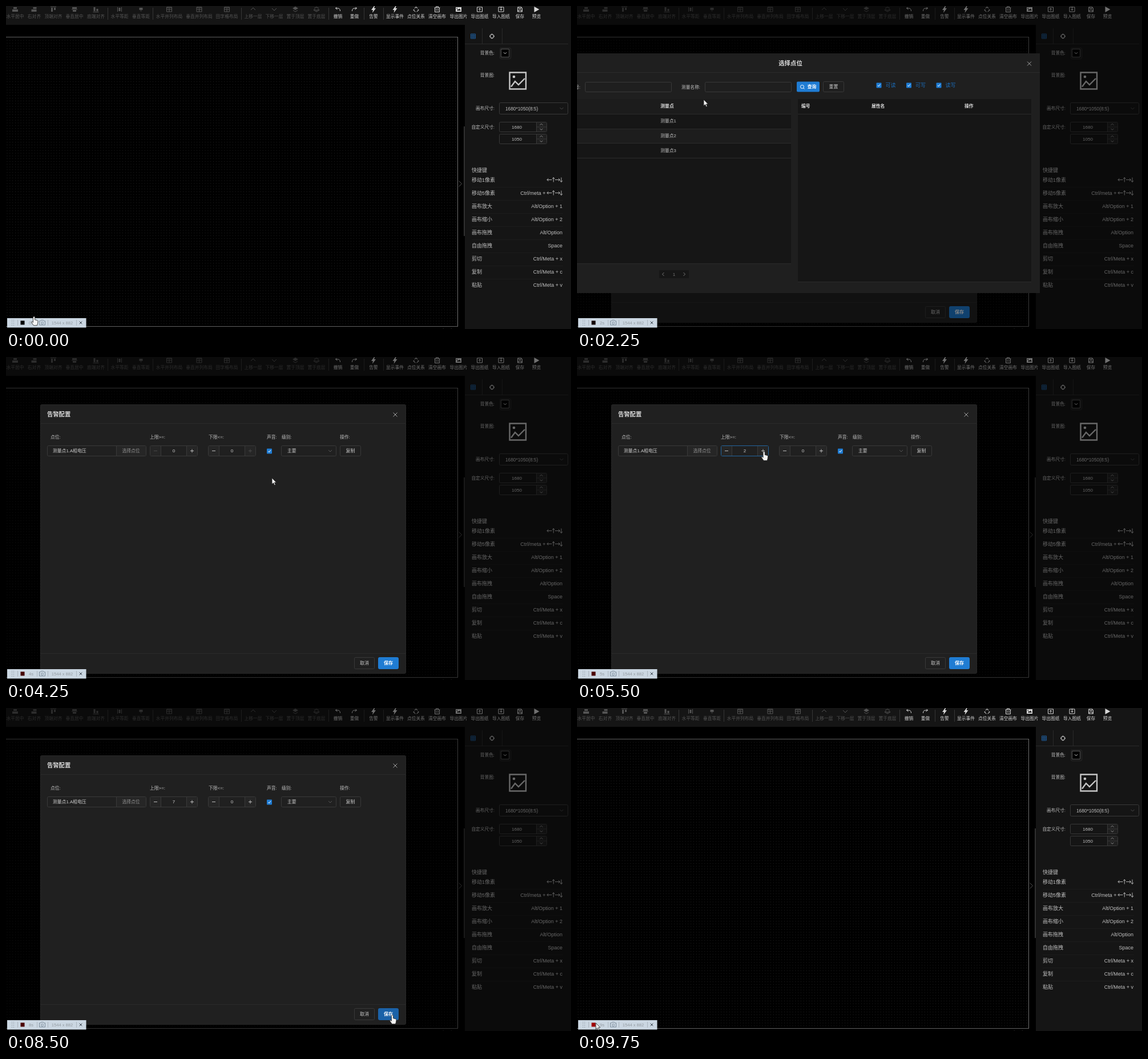
Recreate the animation shown at these times as an HTML page with a canvas. Size 990 by 566 pixels, loop 10 s.

```html
<!DOCTYPE html>
<html lang="zh-CN">
<head>
<meta charset="utf-8">
<title>告警配置</title>
<style>
  html, body { margin: 0; width: 100%; height: 100%; overflow: hidden; background: #000; }
  canvas { display: block; width: 100vw; height: 100vh; }
</style>
</head>
<body>
<canvas width="990" height="566"></canvas>
<script>
const c = document.querySelector('canvas').getContext('2d');
const LOOP = 10000, STEP = 250;
const FONT = '"Liberation Sans", "Noto Sans CJK SC", "Noto Sans CJK", sans-serif';
const BLUE = '#1f7cd3', LINK = '#1b6cb8', EDGE = '#393939', SOFT = '#c0c0c0', SHADE = 'rgba(0,0,0,.48)';

function text(s, x, y, size = 8, color = SOFT, align = 'left', weight = 500) {
  c.font = `${weight} ${size}px ${FONT}`;
  c.textAlign = align;
  c.fillStyle = color;
  c.fillText(s, x, y + size * 0.37);
}
function fill(x, y, w, h, color) {
  c.fillStyle = color;
  c.fillRect(x, y, w, h);
}
function box(x, y, w, h, stroke, color, radius = 2) {
  const inset = stroke ? 0.5 : 0;
  c.beginPath();
  c.roundRect(x + inset, y + inset, w - 2 * inset, h - 2 * inset, radius);
  if (color) { c.fillStyle = color; c.fill(); }
  if (stroke) { c.strokeStyle = stroke; c.lineWidth = 1; c.stroke(); }
}
function shape(d, x, y, { color, stroke, width = 1 }) {
  const path = new Path2D(d);
  c.save();
  c.translate(x, y);
  if (color) { c.fillStyle = color; c.fill(path); }
  if (stroke) { c.strokeStyle = stroke; c.lineWidth = width; c.stroke(path); }
  c.restore();
}
const cross = (x, y, r, color) => shape(`M${-r} ${-r}L${r} ${r}M${r} ${-r}L${-r} ${r}`, x, y, { stroke: color });
const chevron = (x, y, r, color, up = 1) => shape(`M${-r} ${-r * up / 2}L0 ${r * up / 2}L${r} ${-r * up / 2}`, x, y, { stroke: color });

// Icons are drawn around their own centre; solid ones are filled.
const ICONS = {
  center: { d: 'M-3-4h6v3h-6zM-5 0h10v4h-10z', solid: true },
  right: { d: 'M-2-4h6v3h-6zM-5 0h9v4h-9z', solid: true },
  top: { d: 'M-5-5h10v1h-10zM-4-3h3v7h-3zM1-3h3v4h-3z', solid: true },
  middle: { d: 'M-4-4h8v3h-8zM-5-.5h10v1h-10zM-3 1h6v3h-6z', solid: true },
  bottom: { d: 'M-4-4h3v7h-3zM1-1h3v4h-3zM-5 4h10v1h-10z', solid: true },
  spreadX: { d: 'M-4-4h1v8h-1zM3-4h1v8h-1zM-1.5-3h3v6h-3z', solid: true },
  spreadY: { d: 'M-3-3h6v4h-6zM-1 2h2v1h-2z', solid: true },
  table: { d: 'M-4.5-4h9v8h-9zM-4.5-3h9M-4.5 0h9M0-2v6' },
  up: { d: 'M-4 1L0-3L4 1' },
  down: { d: 'M-4-2L0 2L4-2' },
  front: { d: 'M0-5L5-2L0 1L-5-2zM-4 1L0 3.5L4 1V2L0 4.5L-4 2z', solid: true },
  back: { d: 'M-4-2L0-4L4-2M-5 1L0 4L5 1L3 0L0 2L-3 0z' },
  undo: { d: 'M-2-4L-4-2L-1 0M-4-2H0Q4-2 4 3' },
  redo: { d: 'M2-4L4-2L1 0M4-2H0Q-4-2-4 3' },
  bolt: { d: 'M1-6L-4 1H-1L-2 6L4-2H1L2-6z', solid: true },
  link: { d: 'M-3-2A4 4 0 0 1 3-2M4 0A4 4 0 0 1 1 4M-1 4A4 4 0 0 1-4 0M-5 1h2M3 1h2M-1-4h2' },
  trash: { d: 'M-5-3H5M-2-3V-5H2V-3M-4-3V4.5H4V-3M-1.5-1V2.5M1.5-1V2.5' },
  picture: { d: 'M-5-4H5V4H-5zM-3 2H4L1.5-1.5L0 .5L-1.5-.5zM-3.5-2.5v1.5h1.5v-1.5z', solid: true },
  output: { d: 'M-4.5-4H4.5V4H-4.5zM0 2.5V-2M-2 0L0-2L2 0' },
  input: { d: 'M-4.5-4H4.5V4H-4.5zM0-5V1.5M-2-.5L0 1.5L2-.5' },
  disk: { d: 'M-4-4H2.5L4-2.5V4H-4zM-2-4V-1.5H2V-4M-2.5 4V1H2.5V4' },
  play: { d: 'M-4-5L5 0L-4 5z', solid: true },
};
const ARROW_KEYS = 'M0 0H8.5M2.5-2.5L0 0L2.5 2.5M11.3 4V-4M9.3-1.5L11.3-4L13.3-1.5M14 0H22.5M20-2.5L22.5 0L20 2.5M25 -4V4M23 1.5L25 4L27 1.5';
const TOOLS = [
  [16, '水平居中', 'center'], [49.5, '右对齐', 'right'], [83, '顶端对齐', 'top'],
  [120, '垂直居中', 'middle'], [157.5, '底端对齐', 'bottom'],
  [199, '水平等距', 'spreadX'], [236.5, '垂直等距', 'spreadY'],
  [286, '水平并列布局', 'table'], [338.5, '垂直并列布局', 'table'], [387, '田字格布局', 'table'],
  [433, '上移一层', 'up'], [470, '下移一层', 'down'], [507, '置于顶层', 'front'], [544, '置于底层', 'back'],
  [581.5, '撤销', 'undo'], [610.5, '重做', 'redo'], [644, '告警', 'bolt'],
  [681.5, '显示事件', 'bolt'], [718.5, '点位关系', 'link'], [755.5, '清空画布', 'trash'],
  [793, '导出图片', 'picture'], [830, '导出图纸', 'output'], [867.5, '导入图纸', 'input'],
  [900.5, '保存', 'disk'], [929.5, '预览', 'play'],
];
const SHORTCUTS = [
  ['移动1像素', '', true], ['移动5像素', 'Ctrl/meta +', true], ['画布放大', 'Alt/Option + 1'],
  ['画布缩小', 'Alt/Option + 2'], ['画布拖拽', 'Alt/Option'], ['自由拖拽', 'Space'],
  ['剪切', 'Ctrl/Meta + x'], ['复制', 'Ctrl/Meta + c'], ['粘贴', 'Ctrl/Meta + v'],
];

function toolbar() {
  fill(0, 0, 990, 33, '#151515');
  for (const [x, label, name] of TOOLS) {
    const color = x < 560 ? '#545454' : '#d6d6d6', icon = ICONS[name];
    shape(icon.d, x, 6, icon.solid ? { color } : { stroke: color });
    text(label, x, 18.3, 7.75, color, 'center');
  }
  for (const x of [178, 257, 412, 565, 627, 661]) fill(x, 3, 1, 21, '#363636');
}

function drawingArea() {
  const pitch = 4.82;
  for (let y = 55 + pitch; y < 560; y += pitch)
    for (let x = 792 - 164 * pitch; x < 790; x += pitch) fill(x, y, 1, 1, '#262626');
  fill(0, 54, 792, 1, '#606060');
  fill(791, 54, 1, 508, '#707070');
  fill(0, 561, 792, 1, '#606060');
  text('1680 x 1050 (8:5)', 712, 568.5, 9, '#444');
}

function sidebar() {
  fill(804, 33, 186, 533, '#151515');
  fill(802, 211, 2, 192, '#303030');
  shape('M-2.5-5L2.5 0L-2.5 5', 796, 311.5, { stroke: '#555' });
  fill(804, 66, 181, 1, '#2a2a2a');
  fill(834, 39, 1, 27, '#2a2a2a');
  fill(869, 39, 1, 27, '#2a2a2a');
  shape('M-4-4H4V4H-4zM-4-1.3H4M-4 1.3H4M-1.3-4V4M1.3-4V4', 818.5, 53, { stroke: '#1f5a96' });
  shape('M3.5 0A3.5 3.5 0 1 1-3.5 0A3.5 3.5 0 1 1 3.5 0M0-4.5V-2M0 2V4.5M-4.5 0H-2M2 0H4.5', 851.5, 53, { stroke: '#ccc' });

  text('背景色:', 856, 82.5, 7.7, SOFT, 'right');
  box(865, 73, 20, 20, '#2b2b2b');
  box(867, 75, 15, 15, '#585858', '#000', 0);
  chevron(874.5, 82.5, 2.5, '#ddd');
  text('背景图:', 856, 121.5, 7.7, SOFT, 'right');
  shape('M1.5 1.5H30V30.5H1.5zM4 26.5L11 17L17 23L28 12', 881, 115, { stroke: '#c6c6c6', width: 2.4 });
  shape('M2.3 0A2.3 2.3 0 1 1-2.3 0A2.3 2.3 0 1 1 2.3 0', 890, 124, { color: '#c6c6c6' });

  text('画布尺寸:', 856, 179, 7.7, SOFT, 'right');
  box(864, 169, 121, 21, EDGE);
  text('1680*1050(8:5)', 875, 179.5, 8.3);
  chevron(973.5, 179.5, 3, '#4a4a4a');
  text('自定义尺寸:', 856, 212, 7.7, SOFT, 'right');
  [['1680', 203], ['1050', 224]].forEach(([value, y]) => {
    box(864, y, 84, 18, EDGE);
    fill(929, y + 1, 18, 16, '#202020');
    fill(929, y, 1, 18, EDGE);
    fill(929, y + 8.5, 18, 1, EDGE);
    chevron(938, y + 4.5, 2.5, '#8a8a8a', -1);
    chevron(938, y + 13, 2.5, '#8a8a8a');
    text(value, 895, y + 9, 8.1, SOFT, 'center');
  });

  text('快捷键', 816, 287.5, 9);
  SHORTCUTS.forEach(([label, keys, arrows], i) => {
    const y = 304.5 + i * 23.06;
    text(label, 816, y, 9);
    text(keys, arrows ? 945.5 : 975, y, 9, SOFT, 'right');
    if (arrows) shape(ARROW_KEYS, 948, Math.floor(y) + 0.5, { stroke: SOFT, width: 0.9 });
    if (i < 8) fill(816, Math.round(y + 12), 160, 1, '#1c1c1c');
  });
}

function checkbox(x, y) {
  box(x - 4.5, y - 4.5, 9, 9, null, BLUE, 1);
  shape('M-2 0L-.5 1.8L2.2-1.8', x, y, { stroke: '#fff' });
}
function button(label, x, y, w, h, color) {
  box(x, y, w, h, color || EDGE, color);
  text(label, x + w / 2, y + h / 2, 8, color ? '#fff' : '#c8c8c8', 'center', color ? 700 : 500);
}
function stepper(x, value, { focus, minus, plus }) {
  box(x, 155, 84, 19, focus ? '#23659f' : EDGE);
  fill(x + 1, 156, 18, 17, '#262626');
  fill(x + 65, 156, 18, 17, '#262626');
  fill(x + 19, 156, 1, 17, EDGE);
  fill(x + 64, 156, 1, 17, EDGE);
  shape('M-3 0H3', x + 10, 164.5, { stroke: minus ? '#bbb' : '#484848' });
  shape('M-3 0H3M0-3V3', x + 74, 164.5, { stroke: plus ? '#bbb' : '#484848' });
  text(value, x + 42, 164.5, 8, '#ccc', 'center');
}

function alarmDialog(t) {
  box(60, 83, 641, 472, '#272727', '#202020');
  text('告警配置', 72, 100.5, 10.3, '#ddd', 'left', 700);
  cross(682, 101, 3.5, '#a5a5a5');
  fill(60, 116, 640, 1, '#2b2b2b');
  fill(60, 519, 640, 1, '#2b2b2b');
  const heads = [[78, '点位:'], [252, '上限>=:'], [355, '下限<=:'], [457, '声音:'], [483, '级别:'], [585, '操作:']];
  for (const [x, label] of heads) text(label, x, 140, 7.8);

  box(72, 155, 174, 19, EDGE);
  fill(193, 156, 52, 17, '#262626');
  fill(193, 155, 1, 19, EDGE);
  if (t >= 3750) text('测量点1.A相电压', 82, 164.3, 7.8, '#ccc');
  text('选择点位', 219, 164.3, 7.8, '#929292', 'center');

  const clicks = t < 5000 ? 0 : Math.min(7, 1 + Math.floor((t - 5000) / 300));
  stepper(252, clicks, { focus: t >= 5000 && t < 7500, minus: clicks > 0, plus: true });
  stepper(354, 0, { minus: true, plus: clicks > 0 });
  checkbox(461.5, 165);
  box(482, 155, 97, 19, EDGE);
  text('主要', 493, 164.5, 7.8, '#ccc');
  chevron(568, 164.5, 3, '#555');
  button('复制', 585, 155, 37, 19);
  button('取消', 610, 526, 36, 21);
  button('保存', 652, 526, 36, 21, t >= 8250 ? '#1b62a8' : BLUE);
}

function pointDialog(t) {
  const loaded = t >= 2750;
  fill(0, 83, 811, 420, '#1f1f1f');
  text('选择点位', 374, 100.5, 10.4, '#ddd', 'center', 700);
  cross(792.5, 101, 3.5, '#a5a5a5');
  fill(0, 116, 811, 1, '#2b2b2b');
  text('编号:', 6, 142, 7.7, SOFT, 'right');
  box(14, 133, 152, 18, EDGE);
  text('测量名称:', 216, 142, 7.7, SOFT, 'right');
  box(224, 133, 152, 18, EDGE);
  box(385, 132.5, 40, 18, null, BLUE);
  shape('M3 0A3 3 0 1 1-3 0A3 3 0 1 1 3 0M2 2L4 4', 394.5, 141.5, { stroke: '#fff' });
  text('查询', 411.5, 141.5, 7.8, '#fff', 'center', 700);
  button('重置', 431, 132, 37, 19);
  [[529, '可读'], [581.5, '可写'], [634, '读写']].forEach(([x, label]) => {
    checkbox(x, 139);
    text(label, x + 20.5, 139, 9, LINK, 'center');
  });

  fill(0, 163, 375, 289, '#161616');
  fill(387, 163, 409, 321, '#161616');
  fill(0, 163, 375, 26, '#1c1c1c');
  if (loaded) fill(0, 189, 375, 25, '#111d30');
  fill(0, 215, 375, 25, '#1d1d1d');
  text('测量点', 158, 175.5, 7.8, '#ddd', 'center', 700);
  [[393, '编号'], [516, '属性名'], [679, '操作']].forEach(([x, label]) => text(label, x, 175.5, 7.8, '#ddd', 'left', 700));
  fill(0, 189, 375, 1, '#2b2b2b');
  fill(387, 189, 409, 1, '#2b2b2b');
  for (let i = 0; i < 3; i++) {
    const y = 201.5 + i * 25.8;
    text('测量点' + (i + 1), 160, y, 7.7, SOFT, 'center');
    fill(0, Math.round(y + 13), 375, 1, '#2b2b2b');
    if (!loaded) continue;
    text(i + 1, 393, y + 0.5, 8);
    text('ABC'[i] + '相电压', 516, y + 0.5, 7.8);
    text('选择', 679, y + 0.5, 9, LINK);
    fill(387, Math.round(y + 14), 409, 1, '#2b2b2b');
  }
  fill(0, 451, 375, 1, '#2b2b2b');
  fill(387, 483, 409, 1, '#2b2b2b');
  fill(144, 463, 52, 14, '#161616');
  shape('M1.5-3L-1.5 0L1.5 3', 151, 470, { stroke: '#777' });
  shape('M-1.5-3L1.5 0L-1.5 3', 188, 470, { stroke: '#777' });
  text('1', 170, 470, 8, '#777', 'center');
}

function recorder(t) {
  fill(2, 547, 138.5, 16.5, '#cbd7e2');
  for (let i = 0; i < 8; i++) fill(10 + (i % 2) * 3, 550 + (i >> 1) * 3, 1, 1, '#7f8a94');
  for (const x of [20, 54, 73, 123]) fill(x, 550, 1, 10, '#aab4bd');
  const red = t >= 9500 ? 160 : Math.max(0, Math.min(75, (t - 1500) / 40));
  fill(25.5, 551.5, 7, 7, `rgb(${red},0,0)`);
  text(Math.floor(t / 1000) + 's', 44, 555, 7.6, '#929aa1', 'center');
  shape('M-5-3H-3L-2-4.5H2L3-3H5V4H-5zM2 .5A2 2 0 1 1-2 .5A2 2 0 1 1 2 .5', 63.5, 555, { stroke: '#7d8d9c' });
  text('1544 x 882', 98.5, 555, 7.6, '#929aa1', 'center');
  cross(131, 555, 2.3, '#333d47');
}

// time, x, y, shown as a hand
const POINTER = [
  [0, 49, 544, 1], [250, 150, 430, 0], [500, 460, 170, 0], [750, 646, 8, 1], [1000, 648, 7, 1],
  [1250, 560, 50, 0], [1750, 250, 150, 0], [2000, 222, 162, 1], [2250, 222, 164, 0],
  [2500, 235, 190, 0], [2750, 262, 204, 0], [3000, 295, 248, 0], [3250, 510, 226, 0],
  [3500, 687, 200, 1], [3750, 684, 202, 0], [4250, 466, 212, 0], [4750, 328, 166, 1],
  [7000, 327, 165, 1], [7250, 360, 205, 0], [8000, 655, 505, 0], [8250, 676, 536, 1],
  [8500, 677, 538, 1], [9000, 640, 540, 0], [9500, 90, 554, 0], [9750, 33, 552, 0], [LOOP, 33, 552, 0],
];
const HAND = 'M0 0c1.2 0 1.6.8 1.6 1.8v4l4 1q1.6.4 1.4 2l-.6 4-1 3h-6l-3.5-5q-1-2 1-1.8l1.5 1.5v-8.7q0-1.8 1.6-1.8z';
const ARROW = 'M0 0v11l2.6-2.4 1.8 4 1.8-.8-1.8-3.9h3.3z';

function pointer(t) {
  const i = POINTER.findIndex((key, n) => t < POINTER[n + 1][0]);
  const [t0, x0, y0, hand] = POINTER[i], [t1, x1, y1] = POINTER[i + 1];
  const k = (t - t0) / (t1 - t0);
  shape(hand ? HAND : ARROW, x0 + (x1 - x0) * k, y0 + (y1 - y0) * k, { color: '#f4f4f4', stroke: '#222', width: 0.8 });
}

function draw(t) {
  fill(0, 0, 990, 566, '#000');
  toolbar();
  drawingArea();
  sidebar();
  const open = t >= 1000 && t < 9000;
  if (open && t >= 1250) fill(0, 0, 990, 566, SHADE);
  if (open) alarmDialog(t);
  if (t >= 2250 && t < 3750) {
    fill(60, 83, 641, 472, SHADE);
    pointDialog(t);
  }
  recorder(t);
  pointer(t);
}

const start = performance.now();
function tick() {
  const t = (performance.now() - start) % LOOP;
  draw(Math.floor(t / STEP) * STEP);
  requestAnimationFrame(tick);
}
tick();
</script>
</body>
</html>
```
